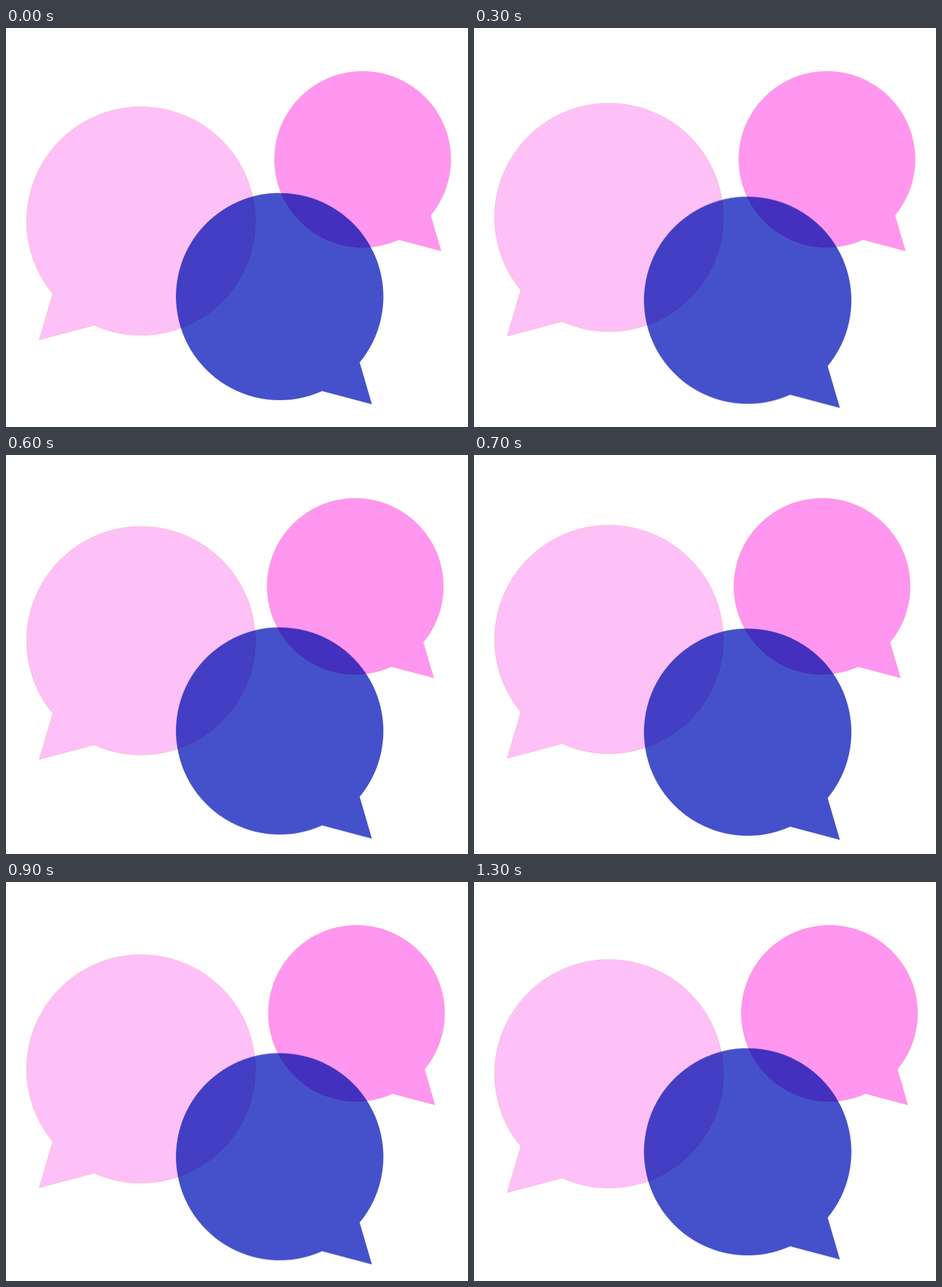
An HTML page that plays this animation: 805 by 696 pixels, repeating every 1400 ms.

```html
<!DOCTYPE html>
<html lang="en">
<head>
<meta charset="utf-8">
<title>Speech bubbles</title>
<style>
  html, body { margin: 0; width: 100%; height: 100%; overflow: hidden; background: #fff; }
  svg { display: block; width: 100%; height: 100%; background: #fff; isolation: isolate; }
  .bubble { animation: drift 1400ms infinite; }
  .pale { --x: 0px; --y: -15px; fill: #fdc1f8; stroke: #fb9a9f; }
  .pink { --x: -15px; --y: 0px; fill: #ff96f0; stroke: #ff8a9c; }
  .blue { --x: 0px; --y: 15px; fill: #4451ca; mix-blend-mode: multiply; }
  .pale, .pink { stroke-width: .7px; stroke-opacity: .7; }

  /* seven held steps out, seven back */
  @keyframes drift {
    0%, 100% { transform: translate(0, 0); animation-timing-function: steps(7, end); }
    50% { transform: translate(var(--x), var(--y)); animation-timing-function: steps(7, end); }
  }
</style>
</head>
<body>
<svg viewBox="0 0 805 696">
  <defs>
    <path id="shape" vector-effect="non-scaling-stroke"
      d="M.772 .636A1 1 0 1 0 .41 .912L.89 1.039Z"/>
  </defs>
  <rect width="805" height="696" fill="#fff"/>
  <g class="bubble pale"><use href="#shape" transform="translate(235.3 336.8) scale(-199.3 199.3)"/></g>
  <g class="bubble pink"><use href="#shape" transform="translate(621.3 229.2) scale(153.6)"/></g>
  <g class="bubble blue"><use href="#shape" transform="translate(476.7 468.5) scale(180.7)"/></g>
</svg>
</body>
</html>
```
